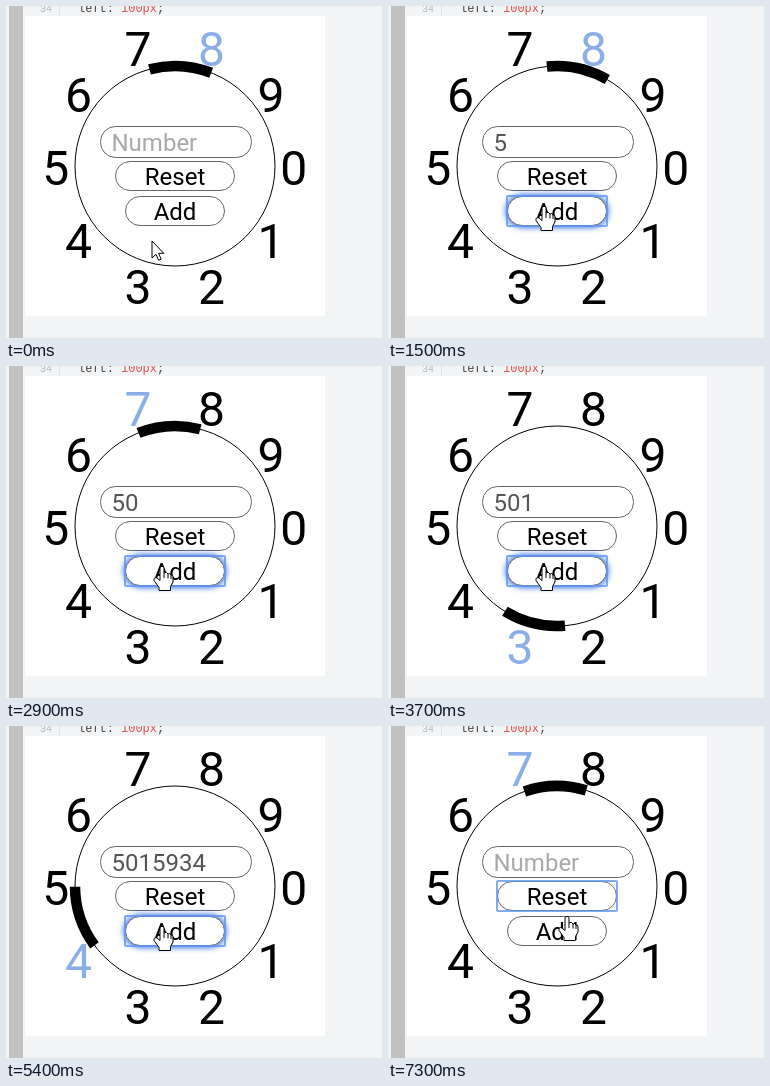
Animation, 376 px wide and 332 px high, one loop 7.35 s. Source, as an HTML page with a canvas:

```html
<!DOCTYPE html>
<html lang="en">
<head>
<meta charset="utf-8">
<title>Number dial</title>
<style>
html, body { margin: 0; width: 100%; height: 100%; overflow: hidden; background: #f3f4f5; }
canvas { display: block; width: 376px; height: 332px; }
</style>
</head>
<body>
<canvas id="stage" width="376" height="332"></canvas>
<script>
const ctx = document.getElementById('stage').getContext('2d');
const LOOP = 7350, STEP = 50;
const SPEED = 0.246, START = 3.2;      // degrees per ms, degrees
const DIGITS = '8901234567';           // clockwise from the top
const CLICKS = [1100, 1800, 3450, 4050, 4650, 5200, 5350, 5800, 6100];
const RESET = 7050;
const PATH = [
  [0, 146, 235], [150, 146, 235], [650, 156, 200], [6000, 156, 200], [6250, 159, 197],
  [6700, 159, 197], [6950, 174, 178], [7150, 174, 178], [7300, 179, 190]
];
const FIELD = { x: 94, y: 120, w: 152, h: 32 };
const RESET_BTN = { x: 109, y: 155, w: 120, h: 30, label: 'Reset' };
const ADD_BTN = { x: 119, y: 190, w: 100, h: 30, label: 'Add' };
const ARROW = new Path2D('M0 0V17L4 13.3L6.6 19.3L9.2 18.2L6.6 12.3H11.8Z');
const HAND = new Path2D('M-2 1.5Q0 -1.2 2 1.5V7Q4.5 5 6 8Q8 6.5 9 9Q11 8.5 11 11V16' +
  'L8.5 20.5V24.5H-3V21.5L-8 14.5Q-8.5 10.5 -5 12L-2 14.5Z');
const KNUCKLES = new Path2D('M2 7V12M6 8V12.5M9 9V13');

const clamp = v => Math.max(0, Math.min(1, v));
const angleAt = t => START + t * SPEED;
const digitAt = t => Math.floor(angleAt(t) / 36) % 10;
const ramp = (t, from, to) => clamp((t - from) / 150) * clamp((to - t) / 100);
const inside = (b, x, y) => x >= b.x && x <= b.x + b.w && y >= b.y && y <= b.y + b.h;

function pointerAt(t) {
  let i = 1;
  while (i < PATH.length - 1 && PATH[i][0] < t) i++;
  const [t0, x0, y0] = PATH[i - 1], [t1, x1, y1] = PATH[i];
  const k = clamp((t - t0) / (t1 - t0)), e = k * k * (3 - 2 * k);
  return [x0 + (x1 - x0) * e, y0 + (y1 - y0) * e];
}

function text(s, x, y, font, color, align = 'left') {
  ctx.font = font;
  ctx.fillStyle = color;
  ctx.textAlign = align;
  ctx.fillText(s, x, y);
}

function rect(x, y, w, h, color) {
  ctx.fillStyle = color;
  ctx.fillRect(x, y, w, h);
}

function pill({ x, y, w, h }, glow = 0) {
  ctx.beginPath();
  ctx.roundRect(x + 0.5, y + 0.5, w - 1, h - 1, 15);
  ctx.fillStyle = '#fff';
  if (glow > 0) {
    ctx.save();
    ctx.shadowColor = `rgba(40, 105, 235, ${glow})`;
    ctx.shadowBlur = 7;
    ctx.fill();
    ctx.fill();
    ctx.restore();
  }
  ctx.fill();
  ctx.strokeStyle = '#666';
  ctx.lineWidth = 1;
  ctx.stroke();
}

function button(b, glow, focused) {
  pill(b, glow);
  if (focused) {
    ctx.strokeStyle = 'rgba(95, 150, 240, 0.8)';
    ctx.lineWidth = 2;
    ctx.beginPath();
    ctx.roundRect(b.x, b.y, b.w, b.h, 1);
    ctx.stroke();
  }
  text(b.label, b.x + b.w / 2, b.y + 24, '24px Roboto, sans-serif', '#000', 'center');
}

function backdrop() {
  rect(0, 0, 376, 332, '#f3f4f5');
  rect(3, 0, 14, 332, '#c1c1c1');
  rect(53, 0, 1, 10, '#e2e4e6');
  text('34', 34, 6, '10px "Liberation Mono", monospace', '#b5b8bb');
  text('left:', 72, 6, '12px "Liberation Mono", monospace', '#444');
  text('100px', 115, 6, '12px "Liberation Mono", monospace', '#e05050');
  text(';', 151, 6, '12px "Liberation Mono", monospace', '#444');
  rect(19, 10, 300, 300, '#fff');
}

function dial(t) {
  ctx.strokeStyle = '#000';
  ctx.lineWidth = 1;
  ctx.beginPath();
  ctx.arc(169, 160, 100, 0, Math.PI * 2);
  ctx.stroke();

  const mid = (angleAt(t) - 90) * Math.PI / 180, half = Math.PI / 10;
  ctx.lineWidth = 10.5;
  ctx.beginPath();
  ctx.arc(169, 160, 100, mid - half, mid + half);
  ctx.stroke();

  const active = digitAt(t);
  [...DIGITS].forEach((d, i) => {
    const a = (18 + 36 * i) * Math.PI / 180;
    text(d, 168.7 + 119 * Math.sin(a), 179 - 125 * Math.cos(a),
      '48px Roboto, sans-serif', i === active ? '#8aaee8' : '#000', 'center');
  });
}

function controls(t) {
  const value = t < RESET
    ? CLICKS.filter(c => c <= t).map(c => DIGITS[digitAt(c)]).join('') : '';
  pill(FIELD);
  text(value || 'Number', 105.5, 145, '24px Roboto, sans-serif', value ? '#555' : '#a9a9a9');
  button(RESET_BTN, ramp(t, 6850, 7280), t >= RESET);
  button(ADD_BTN, ramp(t, 350, 6900), t >= CLICKS[0] && t < RESET);
}

function pointer(t) {
  const [x, y] = pointerAt(t);
  const hot = inside(ADD_BTN, x, y) || inside(RESET_BTN, x, y);
  const shape = hot ? HAND : ARROW;
  ctx.save();
  ctx.translate(x, y);
  ctx.fillStyle = '#fff';
  ctx.strokeStyle = '#000';
  ctx.lineWidth = 1;
  ctx.fill(shape);
  ctx.stroke(shape);
  if (hot) ctx.stroke(KNUCKLES);
  ctx.restore();
}

function draw() {
  const t = Math.floor(performance.now() % LOOP / STEP) * STEP;
  backdrop();
  dial(t);
  controls(t);
  pointer(t);
  requestAnimationFrame(draw);
}
draw();
</script>
</body>
</html>
```
